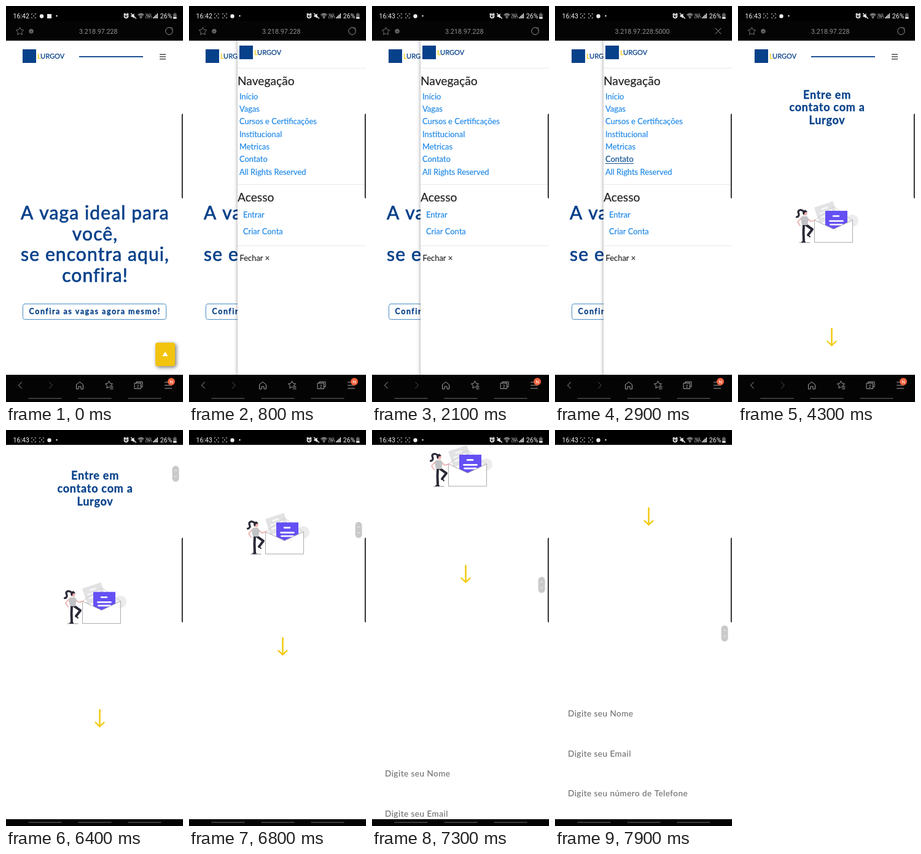
An HTML page with a canvas that plays this animation: 288x640 px, repeating every 8000 ms.

```html
<!DOCTYPE html>
<html lang="pt-BR">
<head>
<meta charset="utf-8">
<title>Vagas</title>
<style>
html, body { margin: 0; width: 100%; height: 100%; overflow: hidden; background: #fff; }
canvas { display: block; width: 288px; height: 640px; }
</style>
</head>
<body>
<canvas id="stage"></canvas>
<script>
const W = 288, H = 640, LOOP = 8000;
const NAVY = '#07418a', LINK = '#1a86e8', YELLOW = '#f3c90f', PURPLE = '#6550f4';
const canvas = document.getElementById('stage');
const dpr = window.devicePixelRatio || 1;
canvas.width = W * dpr;
canvas.height = H * dpr;
const c = canvas.getContext('2d');
c.scale(dpr, dpr);

const clamp = v => Math.max(0, Math.min(1, v));
const easeOut = v => 1 - (1 - v) ** 2.4;

function text(str, x, y, size, color, o = {}) {
  c.font = `${o.weight || 400} ${size}px ${o.family || 'Lato'}, sans-serif`;
  c.letterSpacing = (o.space || 0) + 'px';
  c.textAlign = o.align || 'left';
  c.fillStyle = color;
  c.fillText(str, x, y);
  if (o.thick) {
    c.strokeStyle = color;
    c.lineWidth = o.thick;
    c.lineJoin = 'round';
    c.strokeText(str, x, y);
  }
}

function rect(x, y, w, h, color) {
  c.fillStyle = color;
  c.fillRect(x, y, w, h);
}

function round(x, y, w, h, r, color) {
  c.beginPath();
  c.roundRect(x, y, w, h, r);
  c.fillStyle = color;
  c.fill();
}

function dot(x, y, r, color) {
  c.beginPath();
  c.arc(x, y, r, 0, Math.PI * 2);
  c.fillStyle = color;
  c.fill();
}

function ring(x, y, r, color, from = 0, to = Math.PI * 2, width = 1) {
  c.beginPath();
  c.arc(x, y, r, from, to);
  c.strokeStyle = color;
  c.lineWidth = width;
  c.stroke();
}

function trace(pts) {
  c.beginPath();
  for (let i = 0; i < pts.length; i += 2) c.lineTo(pts[i], pts[i + 1]);
}

function line(pts, color, width = 1) {
  trace(pts);
  c.strokeStyle = color;
  c.lineWidth = width;
  c.lineCap = c.lineJoin = 'round';
  c.stroke();
}

function poly(pts, color) {
  trace(pts);
  c.closePath();
  c.fillStyle = color;
  c.fill();
}

function star(x, y, r, color) {
  const pts = [];
  for (let i = 0; i <= 10; i++) {
    const a = i * Math.PI / 5 - Math.PI / 2, k = i % 2 ? r * 0.52 : r;
    pts.push(x + k * Math.cos(a), y + k * Math.sin(a));
  }
  line(pts, color);
}

// Page parts

function brand(x, y) {
  rect(x, y, 22, 22, NAVY);
  text('L', x + 24, y + 15.3, 11, YELLOW, { thick: 0.25 });
  text('URGOV', x + 29.1, y + 15.3, 11, NAVY, { thick: 0.25 });
}

function header() {
  brand(27, 70);
  rect(119, 81, 104, 1.8, NAVY);
  for (let i = 0; i < 3; i++) rect(250, 77.6 + i * 3.7, 10, 1.4, '#444');
}

function homePage() {
  header();
  ['A vaga ideal para', 'você,', 'se encontra aqui,', 'confira!'].forEach((s, i) =>
    text(s, 145, 345 + i * 33.5, 30, NAVY, { align: 'center', space: 1.1, thick: 0.7 }));
  c.beginPath();
  c.roundRect(27.5, 481.5, 233, 25, 3);
  c.strokeStyle = '#4c8fc4';
  c.lineWidth = 1;
  c.stroke();
  text('Confira as vagas agora mesmo!', 144.7, 498, 12.5, NAVY,
    { align: 'center', weight: 700, space: 1.5, thick: 0.3 });
  c.save();
  c.shadowColor = 'rgba(0,0,0,.55)';
  c.shadowBlur = 6 * dpr;
  c.shadowOffsetX = c.shadowOffsetY = 2 * dpr;
  round(243, 544, 32, 38, 4, '#f2c40f');
  c.restore();
  poly([259, 558.5, 263.5, 566, 254.5, 566], '#fff');
}

function letter() {
  dot(186, 347, 10, '#ececec');
  c.save();
  c.translate(143, 332);
  c.rotate(-0.32);
  rect(-16, -12, 32, 27, '#e2e2e4');
  rect(-6, -7, 11, 3, '#f6f6f6');
  rect(-11, -1, 21, 3, '#f6f6f6');
  rect(-11, 5, 21, 3, '#f6f6f6');
  c.restore();
  line([124.5, 346, 155.5, 324, 186.5, 346], '#c4c4c8', 0.8);
  rect(142, 331, 36, 30, PURPLE);
  line([155, 339.5, 164, 339.5], '#fff', 2.6);
  line([149.5, 347.5, 170.5, 347.5], '#fff', 2.6);
  line([150.5, 353.2, 169.5, 353.2], '#fff', 2.6);
  const front = [124.5, 346, 155.5, 360.5, 186.5, 346, 186.5, 382, 124.5, 382];
  poly(front, '#fff');
  line([...front, 124.5, 346], '#96969a', 0.8);
}

function woman() {
  const skin = '#eeb0ae', dark = '#2b2937';
  line([100, 382.3, 117, 382.3], '#777', 0.8);
  line([103.5, 342, 97, 349, 101, 355], skin, 1.8);
  line([113, 343, 118, 348, 126, 346], skin, 1.8);
  line([107, 354, 106.5, 366, 107, 380], dark, 4);
  line([111, 354, 121, 361, 114, 370], dark, 4);
  line([114, 370, 117, 373], dark, 2);
  line([104, 381.2, 109, 381.2], dark, 2);
  poly([104, 340, 112, 339.5, 115, 344, 113, 354, 104, 354, 102, 344], '#c3c3c6');
  dot(109, 335, 3.6, skin);
  c.beginPath();
  c.moveTo(107, 332);
  c.bezierCurveTo(101, 327, 96, 331, 99, 336);
  c.bezierCurveTo(100, 339, 97, 341, 95.5, 341);
  c.strokeStyle = dark;
  c.lineWidth = 3.2;
  c.stroke();
  poly([105, 335, 106, 330.5, 110, 329.5, 113, 333, 109, 333.5, 107, 338], dark);
}

function contactPage(t) {
  header();
  ['Entre em', 'contato com a', 'Lurgov'].forEach((s, i) =>
    text(s, 145, 149.5 + i * 20.7, 18, NAVY,
      { align: 'center', weight: 700, space: 0.75, thick: 0.3 }));
  letter();
  woman();
  const y = 542.5 + 6 * Math.cos((t - 6400) / 2100 * Math.PI * 2);
  line([152.5, y - 27, 152.5, y], YELLOW, 2.5);
  line([145.5, y - 6.5, 152.5, y, 159.5, y - 6.5], YELLOW, 2.3);
  ['Nome', 'Email', 'número de Telefone'].forEach((s, i) =>
    text('Digite seu ' + s, 21, 851.5 + i * 64.5, 13.5, '#757575', { space: 0.5, thick: 0.2 }));
}

function menu(shift, tapped) {
  c.save();
  c.translate(shift, 0);
  c.save();
  c.shadowColor = 'rgba(0,0,0,.4)';
  c.shadowBlur = 6 * dpr;
  rect(79, 40, 230, 580, '#fff');
  c.restore();
  brand(82, 64);
  for (const y of [100, 288, 387]) rect(79, y, 209, 1, '#e9e9e9');
  const link = (s, x, y, color = LINK) => text(s, x, y, 12.9, color, { thick: 0.15 });
  text('Navegação', 79, 128.3, 19.2, '#222', { thick: 0.2 });
  ['Início', 'Vagas', 'Cursos e Certificações', 'Institucional', 'Metricas', 'Contato',
    'All Rights Reserved'].forEach((s, i) => {
    const active = tapped && s === 'Contato', y = 150.8 + i * 20.3;
    link(s, 82, y, active ? '#0a4f96' : LINK);
    if (active) rect(82, y + 1.8, 46, 1, '#0a4f96');
  });
  text('Acesso', 79, 315.8, 19.2, '#222', { thick: 0.2 });
  link('Entrar', 88, 341.8);
  link('Criar Conta', 88, 368.8);
  link('Fechar ×', 82.5, 411.8, '#222');
  c.restore();
}

// Phone interface

function scanIcon(x) {
  for (const i of [-1, 1]) for (const j of [-1, 1])
    line([x + i * 3.5, 16 + j * 1.8, x + i * 3.5, 16 + j * 3.5, x + i * 1.8, 16 + j * 3.5],
      '#aaa', 0.9);
  dot(x, 16, 1.2, '#888');
}

function statusBar(t) {
  const sans = { family: 'Roboto' };
  rect(0, 0, W, 24, '#000');
  text(t < 1100 ? '16:42' : '16:43', 11.5, 20, 10.6, '#f2f2f2', sans);
  scanIcon(45);
  if (t < 500) {
    dot(58, 16.5, 3.2, '#eee');
    round(67, 13, 7, 7, 0, '#eee');
  } else {
    scanIcon(58);
    dot(70.5, 16.5, 3.2, '#eee');
  }
  dot(82.5, 16, 1.2, '#eee');
  ring(195.5, 16.3, 3, '#eee', 0, Math.PI * 2, 1.7);
  line([195.5, 14.8, 195.5, 16.5, 196.7, 16.5], '#eee');
  line([191.8, 13.4, 193.4, 12], '#eee', 1.3);
  line([199.2, 13.4, 197.6, 12], '#eee', 1.3);
  poly([203.5, 14.8, 205.5, 14.8, 208.5, 12, 208.5, 20, 205.5, 17.5, 203.5, 17.5], '#eee');
  line([203.5, 12, 211.5, 20], '#eee', 1.3);
  for (const r of [2.8, 5, 7]) ring(219.5, 19.3, r, '#eee', -2.3, -0.85);
  dot(219.5, 19, 1, '#eee');
  text('Vo))', 227, 15.5, 5, '#eee', sans);
  text('LTE1', 227, 20.3, 5, '#eee', sans);
  for (let i = 0; i < 4; i++) rect(239 + i * 2.2, 18 - i * 2, 1.5, 2 + i * 2, '#eee');
  text('26%', 250.8, 20, 10.7, '#f2f2f2', sans);
  rect(273.5, 11.3, 2.5, 1.2, '#777');
  rect(272, 12.5, 5.5, 8, '#666');
  rect(272, 18, 5.5, 2.5, '#eee');
}

function addressBar(loading) {
  const gray = '#929292', o = { family: 'Roboto', align: 'center' };
  rect(0, 24, W, 32, '#040404');
  if (loading) {
    text('3.218.97.228:5000', 142, 45, 10.7, gray, o);
    line([261, 36, 270, 45], gray);
    line([270, 36, 261, 45], gray);
    return;
  }
  star(22.5, 41, 6.5, '#777');
  dot(41, 40.8, 3.7, '#666');
  rect(40.5, 40, 1, 3, '#111');
  text('3.218.97.228', 150.3, 45, 10.7, gray, o);
  ring(265.5, 40.5, 5.8, gray, -0.3, 5.3);
  line([267, 35.3, 270.5, 35.6, 270.3, 39], gray);
}

function toolBar() {
  const gray = '#a2a2a2';
  rect(0, 596, W, 44, '#040404');
  line([25.5, 608, 20.5, 613, 25.5, 618], gray);
  line([70.5, 608, 75.5, 613, 70.5, 618], '#555');
  line([114.5, 612, 120, 607.5, 125.5, 612, 125.5, 619, 122, 619, 122, 615, 118, 615,
    118, 619, 114.5, 619, 114.5, 612], gray);
  star(167.5, 612.5, 6.2, gray);
  rect(169, 614, 7, 6, '#040404');
  for (let i = 0; i < 3; i++) line([169.5, 614.5 + i * 2.2, 174, 614.5 + i * 2.2], gray, 0.9);
  line([212, 609, 212, 607.5, 222, 607.5, 222, 615.5, 220.5, 615.5], gray);
  c.strokeRect(209.5, 609.5, 10, 9);
  text('2', 214.5, 617, 7.5, gray, { family: 'Roboto', align: 'center' });
  for (let i = 0; i < 3; i++) line([258.5, 608 + i * 5, 269.5, 608 + i * 5], gray, 1.2);
  dot(269, 607, 6, '#f0603c');
  text('N', 269, 610, 8, '#fff', { family: 'Roboto', align: 'center' });
}

function scrollThumb(scroll) {
  const y = 14 + 0.81 * scroll;
  round(270.5, y - 12.5, 11, 26, 5.5, '#c9c9c9');
  line([274, y - 3.5, 276, y - 5.5, 278, y - 3.5], '#f4f4f4', 1);
  line([274, y + 4, 276, y + 6, 278, y + 4], '#f4f4f4', 1);
}

// Drag up to 6400 ms, then a decaying fling
function scrollAt(t) {
  if (t <= 6400) return 69 * clamp((t - 6130) / 270) ** 1.3;
  return 69 + 564 * (1 - Math.exp((6400 - t) / 1800));
}

function draw(t) {
  const scroll = scrollAt(t), hide = Math.min(33, scroll);
  rect(0, 0, W, H, '#fff');
  c.save();
  c.translate(0, -scroll);
  if (t < 3400) homePage();
  else contactPage(t);
  c.restore();
  if (t > 50 && t < 3400) menu(215 * (1 - easeOut(clamp((t - 50) / 400))), t >= 2800);
  if (scroll > 33) scrollThumb(scroll);
  round(285.7, 174, 5, 137, 2, '#4a4a4a');

  c.save();
  c.translate(0, -hide);
  addressBar(t >= 2800 && t < 3800);
  c.restore();
  c.save();
  c.translate(0, hide);
  toolBar();
  c.restore();
  statusBar(t);
  rect(0, 629, W, 11, '#040404');
  for (const x of [37, 118, 199]) line([x, 634.3, x + 53, 634.3], '#4a4a4a', 1.6);
}

function frame() {
  draw(performance.now() % LOOP);
  requestAnimationFrame(frame);
}
frame();
</script>
</body>
</html>
```
